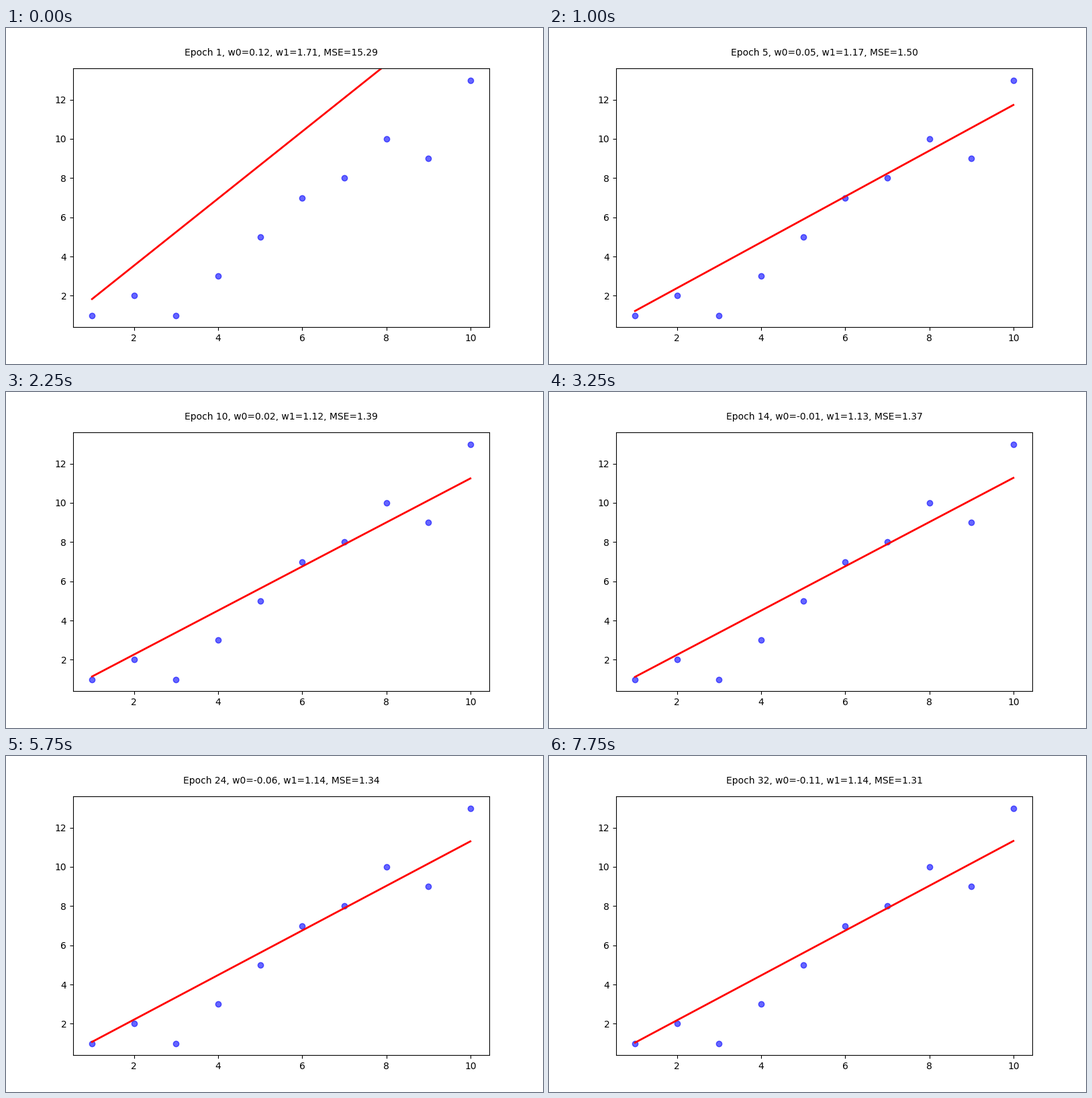
Recreate the animation shown at these times as a matplotlib script. Size 800 by 500 pixels, loop 8000 ms.

```python
import numpy as np
import matplotlib.pyplot as plt
from matplotlib.animation import FuncAnimation

EPOCHS = 32
INTERVAL = 250  # ms
RATE = 0.02

x = np.arange(1, 11)
y = np.array([1, 2, 1, 3, 5, 7, 8, 10, 9, 13])


def fit(epochs):
    """Gradient descent; the slope step uses the already updated intercept."""
    w0 = w1 = 0.0
    history = []
    for _ in range(epochs):
        w0 -= RATE * np.mean(w0 + w1 * x - y)
        w1 -= 2 * RATE * np.mean((w0 + w1 * x - y) * x)
        mse = np.mean((w0 + w1 * x - y) ** 2)
        history.append((w0, w1, mse))
    return history


history = fit(EPOCHS)

fig, ax = plt.subplots(figsize=(8, 5), dpi=100)
ax.scatter(x, y, color="blue", alpha=0.6)
ax.set_xlim(0.55, 10.45)
ax.set_ylim(0.4, 13.6)
line, = ax.plot([], [], color="red", lw=2)
label = ax.text(0.5, 1.05, "", transform=ax.transAxes, ha="center", fontsize=10)


def update(i):
    w0, w1, mse = history[i]
    line.set_data(x, w0 + w1 * x)
    label.set_text(f"Epoch {i + 1}, w0={w0:.2f}, w1={w1:.2f}, MSE={mse:.2f}")
    return line, label


anim = FuncAnimation(fig, update, frames=EPOCHS, interval=INTERVAL, repeat=True)
plt.show()
```
